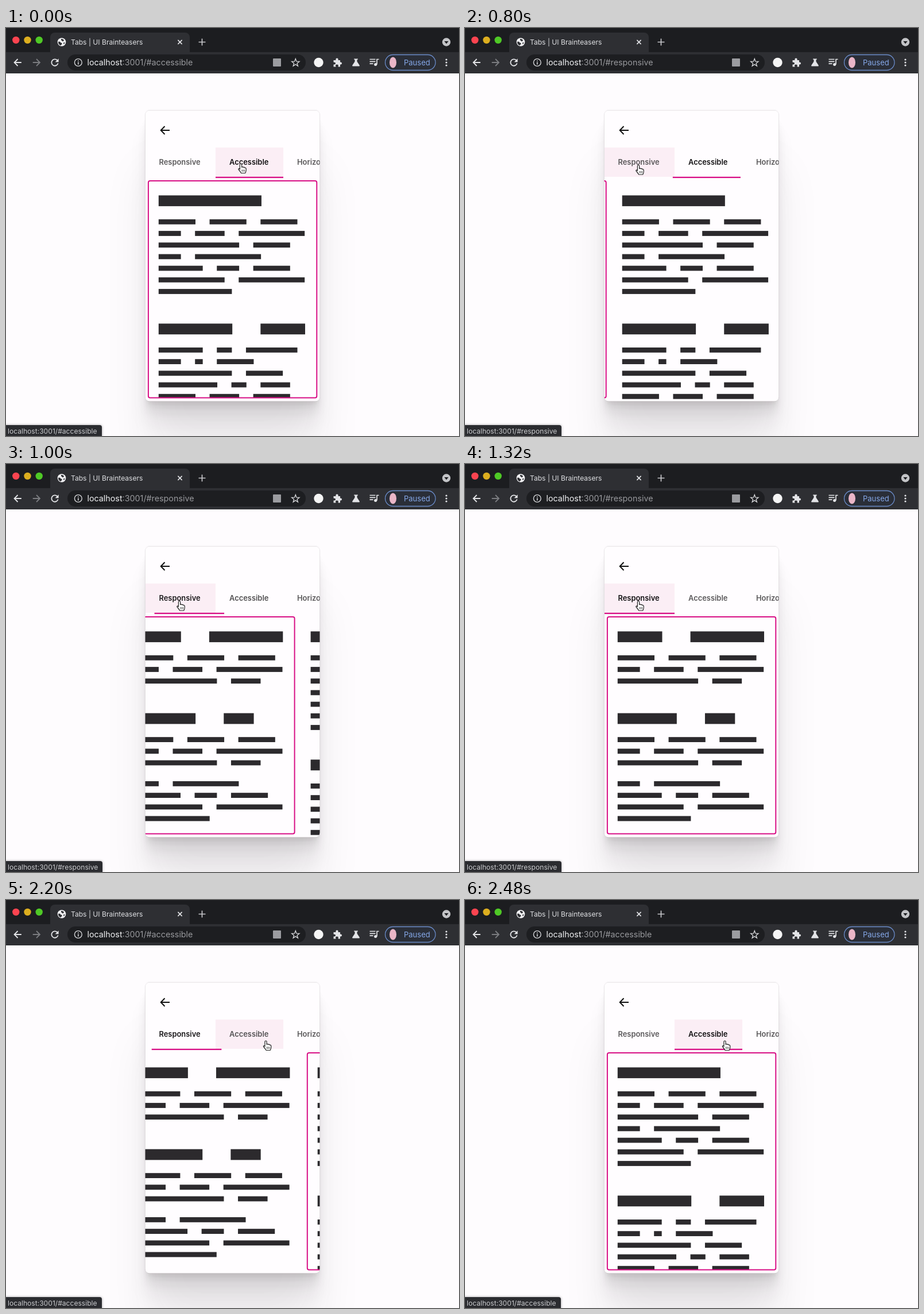
Animation, 789 px wide and 710 px high, one loop 2.52 s. Source, as an HTML page with a canvas:

```html
<!DOCTYPE html>
<html lang="en">
<head>
<meta charset="utf-8">
<title>Tabs</title>
<style>
html, body { margin: 0; width: 100%; height: 100%; overflow: hidden; background: #fefcfe; }
canvas { display: block; }
</style>
</head>
<body>
<canvas id="stage" width="789" height="710"></canvas>
<script>
const W = 789, H = 710, LOOP = 2520, STEP = 40;
const PINK = '#d80f85', PAPER = '#fefcfe', INK = '#2c2a2d', LIGHT = '#e4e5e8';
const CARD = { x: 242.5, y: 143.5, w: 304, h: 506, r: 8 };
const PITCH = 303.5;
const stage = document.getElementById('stage').getContext('2d');
let ctx = stage;

// Each line is a list of word lengths; "#" marks a heading and "-" a paragraph break.
const PANELS = [
  '#3 5|5 5 5|3 4 9|11 4|#4 2|5 5 5|3 4 9|11 4|-3 9|6 3 5|9 9|10',
  '#7|5 5 5|3 4 9|11 5|3 9|6 3 5|9 9|10|#5 3|6 2 7|3 1 5|10 5|8 2 4|5 4 5'
].map(text => text.split('|'));

const TABS = [
  { label: 'Responsive', hash: 'responsive', x: 243, w: 122, textX: 266.5 },
  { label: 'Accessible', hash: 'accessible', x: 365, w: 118, textX: 389 },
  { label: 'Horizontal', x: 483, w: 120, textX: 507 }
];

// Presses run from down to up; the scroll to the clicked tab follows the release.
const PRESSES = [
  { down: 600, up: 750, scroll: 764, tab: 0 },
  { down: 1930, up: 2115, scroll: 2135, tab: 1 }
];
const SCROLL_TIME = 314;
const MOVES = [
  { from: 20, to: 500, a: [409, 236], b: [302, 238.5] },
  { from: 1360, to: 1760, a: [302, 238.5], b: [452.5, 245] }
];

const mix = (a, b, p) => a + (b - a) * p;
const clamp = v => Math.min(1, Math.max(0, v));
const smooth = s => s * s * (3 - 2 * s);

// cubic-bezier(.42, 0, .58, 1)
function easeInOut(x) {
  let lo = 0, hi = 1;
  for (let i = 0; i < 20; i++) {
    const s = (lo + hi) / 2, u = 1 - s;
    if (1.26 * u * u * s + 1.74 * u * s * s + s * s * s < x) lo = s; else hi = s;
  }
  return smooth(lo);
}

function rect(x, y, w, h, color) {
  ctx.fillStyle = color;
  ctx.fillRect(x, y, w, h);
}
function roundPath(x, y, w, h, r) {
  ctx.beginPath();
  ctx.roundRect(x, y, w, h, r);
}
function roundFill(x, y, w, h, r, color) {
  roundPath(x, y, w, h, r);
  ctx.fillStyle = color;
  ctx.fill();
}
function disc(x, y, r, color) {
  ctx.beginPath();
  ctx.arc(x, y, r, 0, 7);
  ctx.fillStyle = color;
  ctx.fill();
}
function ring(x, y, r, color, width) {
  ctx.beginPath();
  ctx.arc(x, y, r, 0, 7);
  ctx.strokeStyle = color;
  ctx.lineWidth = width;
  ctx.stroke();
}
// Icon paths are relative to their centre.
function icon(x, y, d, { fill, stroke, width = 1.6 }) {
  const path = new Path2D(d);
  ctx.save();
  ctx.translate(x, y);
  if (fill) { ctx.fillStyle = fill; ctx.fill(path); }
  if (stroke) { ctx.strokeStyle = stroke; ctx.lineWidth = width; ctx.stroke(path); }
  ctx.restore();
}
function text(str, x, y, size, color, weight = 400) {
  ctx.font = `${weight} ${size}px Inter, sans-serif`;
  ctx.fillStyle = color;
  ctx.fillText(str, x, y);
  return x + ctx.measureText(str).width;
}

function drawShadow() {
  // offset, blur, inset, alpha
  const layers = [[100, 80, 2, .08], [41, 33, 2, .07], [22, 18, 2, .06],
    [12, 10, 2, .05], [7, 5, 2, .04], [3, 2, 2, .04], [-1, 2, 0, .05]];
  for (const [dy, blur, inset, alpha] of layers) {
    ctx.save();
    ctx.shadowColor = `rgba(42, 32, 38, ${alpha})`;
    ctx.shadowBlur = blur;
    ctx.shadowOffsetY = dy;
    roundFill(CARD.x + inset, CARD.y + inset, CARD.w - 2 * inset, CARD.h - 2 * inset, CARD.r, PAPER);
    ctx.restore();
  }
  roundPath(CARD.x, CARD.y, CARD.w, CARD.h, CARD.r);
  ctx.strokeStyle = 'rgba(60, 45, 55, .12)';
  ctx.lineWidth = 1;
  ctx.stroke();
}

function drawTabStrip() {
  rect(0, 0, W, 42, '#1c1d20');
  ['#fb4450', '#dcae1f', '#4fc926'].forEach((c, i) => disc(17.3 + i * 20.2, 21, 6.2, c));
  roundFill(77, 8, 243, 36, [8, 8, 0, 0], '#2e2f33');
  disc(97, 24.5, 7.3, '#f2f2f4');
  icon(97, 24.5, 'M-5.5-1Q-2-1-2 1Q1 1 .5 4Q-1.5 4-1.5 6Q-5 5-6 1ZM-1-5.5Q2-6 4-3.5Q3-1 1.5-1Q1-3-1-3ZM3 1L5.7 .5Q5 3 3.5 4Z', { fill: '#2e2f33' });
  text('Tabs | UI Brainteasers', 113, 28.5, 12.1, '#dedfe2');
  icon(303, 24.5, 'M-3.6-3.6L3.6 3.6M3.6-3.6L-3.6 3.6', { stroke: LIGHT });
  icon(341.5, 24.5, 'M-6 0H6M0-6V6', { stroke: '#c6c7ca', width: 1.7 });
  disc(767, 24.5, 7.2, '#c3c4c7');
  icon(767, 25, 'M-3.6-2H3.6L0 2.6Z', { fill: '#1c1d20' });
}

function drawToolbar() {
  rect(0, 42, W, 37, '#2e2f33');
  icon(20.5, 60, 'M6.3 0H-5.5M0-6L-6 0L0 6', { stroke: LIGHT, width: 1.8 });
  icon(53, 60, 'M-6.3 0H5.5M0-6L6 0L0 6', { stroke: '#7b7c80', width: 1.8 });
  icon(85, 60, 'M4.2-3.9A5.7 5.7 0 1 0 5.6 1.4', { stroke: LIGHT, width: 1.8 });
  icon(85, 60, 'M6.6-6.8V-.8H.6Z', { fill: LIGHT });
  roundFill(107, 46, 415, 28, 14, '#1d1e21');
  ring(125.8, 60, 6.4, '#d5d6d9', 1.4);
  icon(125.8, 60, 'M0-.8V3.5M0-3.4V-1.9', { stroke: '#d5d6d9' });
  roundFill(465, 53, 14, 14, 1, '#9b9ca0');
  let star = '';
  for (let i = 0; i < 10; i++) {
    const r = i % 2 ? 2.9 : 7, a = -Math.PI / 2 + i * Math.PI / 5;
    star += (i ? 'L' : 'M') + r * Math.cos(a) + ' ' + r * Math.sin(a);
  }
  icon(504.3, 60.5, star + 'Z', { stroke: '#d5d6d9', width: 1.3 });
  disc(544.5, 60, 8.2, '#f5f5f5');
  icon(577, 60.5, 'M-6.5-4.5H-2.5Q-3.2-8-.5-8Q2.2-8 1.5-4.5H5V-1Q8-1.6 8 1Q8 3.6 5 3V7H1.6Q2-.1 2 4Q-1 2-3 4Q-3 5-2.4 7H-6.5V3Q-3 3-3 1Q-3-1-6.5-1Z', { fill: LIGHT });
  icon(609.5, 60, 'M-3.3-6.5H3.3V-5H2V-1.6L6.3 5Q6.8 6.5 5.3 6.5H-5.3Q-6.8 6.5-6.3 5L-2-1.6V-5H-3.3Z', { fill: LIGHT });
  icon(641, 59.5, 'M-7.5-5H2.5M-7.5-1.2H2.5M-7.5 2.6H-1.5M5 4V-5H8.5', { stroke: LIGHT, width: 1.7 });
  disc(643.6, 63.6, 2.5, LIGHT);
  roundPath(660.5, 46.5, 87.5, 27, 13.5);
  ctx.fillStyle = '#2a2e38';
  ctx.fill();
  ctx.strokeStyle = '#6a8bc8';
  ctx.lineWidth = 1.3;
  ctx.stroke();
  ctx.beginPath();
  ctx.ellipse(674, 60, 6, 9.5, 0, 0, 7);
  ctx.fillStyle = '#eab6c8';
  ctx.fill();
  text('Paused', 693, 64.8, 13, '#86a9ea');
  [-5, 0, 5].forEach(dy => disc(767, 60 + dy, 1.6, LIGHT));
}

const backdrop = document.createElement('canvas');
backdrop.width = W;
backdrop.height = H;
ctx = backdrop.getContext('2d');
rect(0, 0, W, H, PAPER);
drawShadow();
drawTabStrip();
drawToolbar();
ctx = stage;

function drawBars(lines, left) {
  let y = 300.7, previous = '#';
  lines.forEach((line, i) => {
    const heading = line[0] === '#';
    if (i) y += heading ? 65.3 : previous[0] === '#' ? 36.6 : line[0] === '-' ? 36.4 : 20.2;
    previous = line;
    const unit = heading ? 25.36 : 12.68, h = heading ? 18.8 : 8.8, bleed = heading ? 1.6 : .8;
    let column = 0;
    for (const word of line.replace(/[#-]/, '').split(' ').map(Number)) {
      rect(left + column * unit, y - h / 2, word * unit + bleed, h, INK);
      column += word + 2;
    }
  });
}

function drawPanel(index, offset, focused) {
  ctx.save();
  if (focused) {
    ctx.beginPath();
    ctx.rect(247 + offset, 262, 295, 382);
    ctx.clip();
  }
  drawBars(PANELS[index], 265.8 + offset);
  ctx.restore();
  if (focused) {
    roundPath(247.9 + offset, 266, 293.4, 377.5, 3);
    ctx.strokeStyle = PINK;
    ctx.lineWidth = 2;
    ctx.stroke();
  }
}

function drawTabs(position, hovered) {
  const [first, second] = TABS, over = TABS[hovered];
  rect(over.x, 208, over.w, 51, '#fbeef5');
  TABS.forEach((tab, i) => {
    const shade = Math.round(mix(20, 92, clamp(Math.abs(position - i))));
    text(tab.label, tab.textX, 237.7, 12.9, `rgb(${shade}, ${shade - 2}, ${shade})`, 600);
  });
  rect(mix(first.x, second.x, position), 258.8, mix(first.w, second.w, position), 2.3, PINK);
}

function drawCard(position, hovered, focus) {
  ctx.save();
  roundPath(CARD.x, CARD.y, CARD.w, CARD.h, CARD.r);
  ctx.clip();
  rect(CARD.x, CARD.y, CARD.w, CARD.h, '#fffdff');
  icon(277, 178, 'M8 0H-7M-.5-7L-7.3 0L-.5 7', { stroke: '#111', width: 2 });
  drawTabs(position, hovered);
  PANELS.forEach((_, i) => drawPanel(i, (i - position) * PITCH, focus === i));
  ctx.restore();
}

function drawStatus(hash) {
  ctx.save();
  ctx.shadowColor = 'rgba(0, 0, 0, .35)';
  ctx.shadowBlur = 4;
  roundFill(-4, 691, hash === 'accessible' ? 171 : 172, 24, [0, 4, 0, 0], '#2b2c30');
  ctx.restore();
  text('localhost:3001/#' + hash, 3, 706, 12.1, '#c9cacd');
}

function drawPointer(x, y, pressed) {
  if (pressed) ring(x, y - .8, 31, '#111', 1.6);
  icon(x, y, 'M-1.6 9.5V1.6Q-1.5 0 0 0Q1.5 0 1.6 1.6V6Q3 4.9 4.2 6.4Q5.8 5.6 6.8 7.2Q8.9 6.7 9.2 9V11.5Q9 14 7.7 16.5H.6Q-1 13.5-3.8 10.5Q-4.6 9-3.3 8.6Q-2.4 8.6-1.6 9.5Z',
    { fill: '#fff', stroke: '#222', width: 1.2 });
  icon(x, y, 'M2 10.5V14M4.2 10.5V14M6.4 10.5V14', { stroke: '#333', width: .9 });
}

function pointerAt(t) {
  const move = t < 1000 ? MOVES[0] : MOVES[1];
  const p = smooth(clamp((t - move.from) / (move.to - move.from)));
  return move.a.map((v, i) => mix(v, move.b[i], p));
}

function draw(t) {
  let position = 1, current = 1, focus = 1, pressed = false;
  for (const press of PRESSES) {
    if (t < press.down) break;
    pressed = t < press.up;
    focus = pressed ? -1 : press.tab;
    if (!pressed) current = press.tab;
    position = mix(position, press.tab, easeInOut(clamp((t - press.scroll) / SCROLL_TIME)));
  }
  const [x, y] = pointerAt(t);
  const hovered = x < TABS[1].x ? 0 : 1;

  ctx.drawImage(backdrop, 0, 0);
  const end = text('localhost', 141.5, 65, 14.3, '#f0f1f3');
  text(':3001/#' + TABS[current].hash, end, 65, 14.3, '#98999d');
  drawCard(position, hovered, focus);
  drawStatus(TABS[hovered].hash);
  drawPointer(x, y, pressed);
}

function tick(now) {
  draw(Math.floor(now / STEP) * STEP % LOOP);
  requestAnimationFrame(tick);
}
requestAnimationFrame(tick);
</script>
</body>
</html>
```
